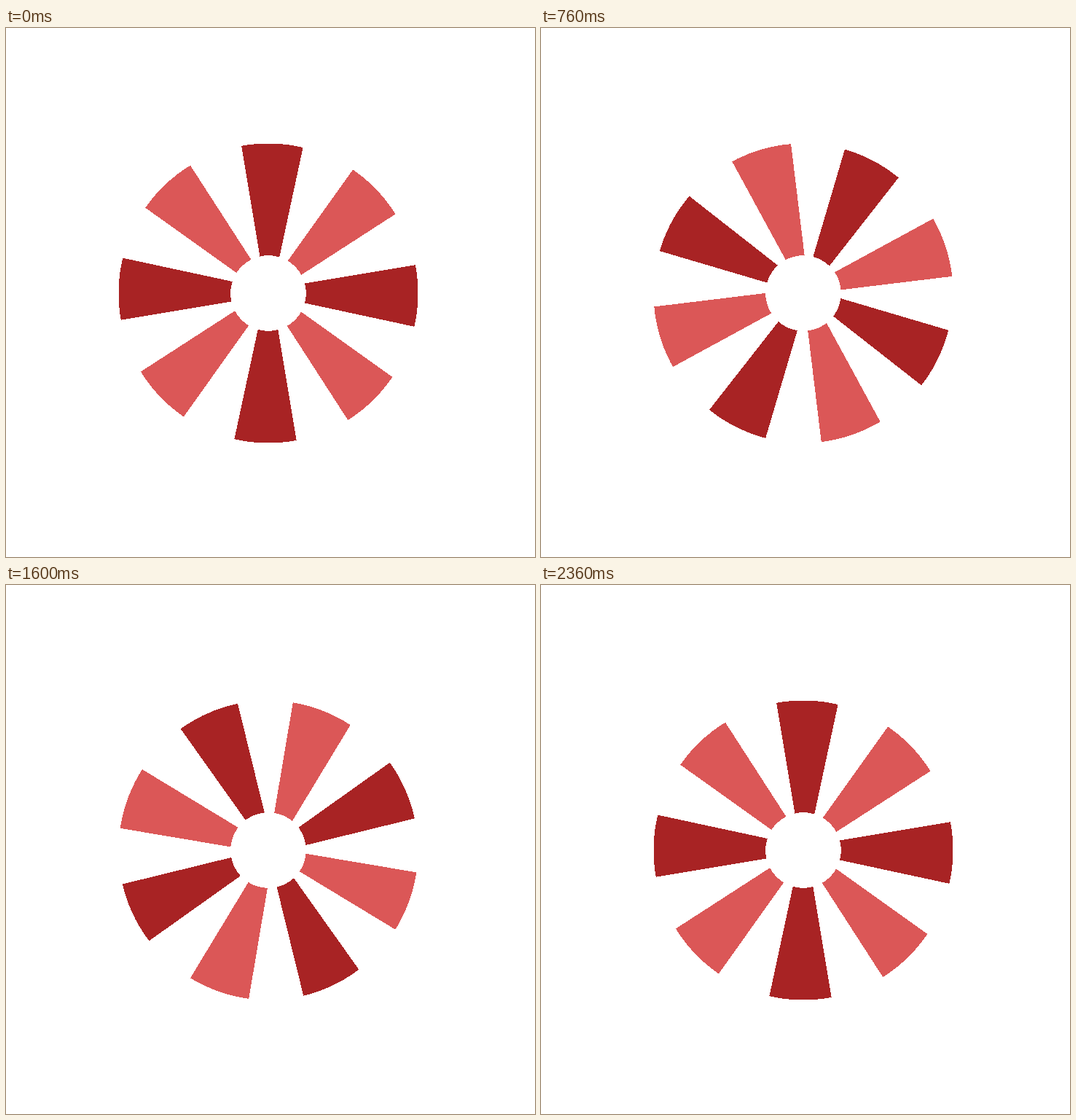
An HTML page for the animation above (2400 ms loop, 726 by 726 pixels).

```html
<!DOCTYPE html>
<html lang="en">
<head>
<meta charset="utf-8">
<title>Spinning wheel</title>
<style>
  html, body { margin: 0; width: 100%; height: 100%; overflow: hidden; background: #fff; }
  svg { display: block; width: 100%; height: 100%; }
</style>
</head>
<body>
<svg viewBox="0 0 726 726" shape-rendering="crispEdges">
  <g id="wheel"></g>
  <!-- fixed white mask: outer ring and hub -->
  <circle cx="360" cy="364" r="245.5" fill="none" stroke="#fff" stroke-width="80"/>
  <circle cx="360" cy="364" r="51.8" fill="#fff"/>
</svg>
<script>
  const STEP = 40, LOOP = 2400, TURN = 59;
  const PIVOT = [362.7, 362.9], WOBBLE = 1.95;
  const COLORS = ['#a82324', '#db5757'];
  const wheel = document.getElementById('wheel');

  // The blades' hub sits slightly off the pivot they turn around.
  const halfWidth = d => 4.05 + 0.191 * d;
  const near = 30, far = 230;
  const blade = `M${-halfWidth(near)} ${-near}L${-halfWidth(far)} ${-far}` +
                `H${halfWidth(far)}L${halfWidth(near)} ${-near}Z`;

  for (let i = 0; i < 8; i++) {
    const path = document.createElementNS('http://www.w3.org/2000/svg', 'path');
    path.setAttribute('d', blade);
    path.setAttribute('fill', COLORS[i % 2]);
    path.setAttribute('transform', `rotate(${i * 45})`);
    wheel.append(path);
  }

  function draw(time) {
    const turn = Math.floor((time % LOOP) / STEP) * 360 / TURN;
    const a = (182 + turn) * Math.PI / 180;
    const x = PIVOT[0] + WOBBLE * Math.cos(a);
    const y = PIVOT[1] + WOBBLE * Math.sin(a);
    wheel.setAttribute('transform', `translate(${x} ${y}) rotate(${1.33 + turn})`);
  }

  let start;
  function tick(now) {
    start ??= now;
    draw(now - start);
    requestAnimationFrame(tick);
  }
  draw(0);
  requestAnimationFrame(tick);
</script>
</body>
</html>
```
